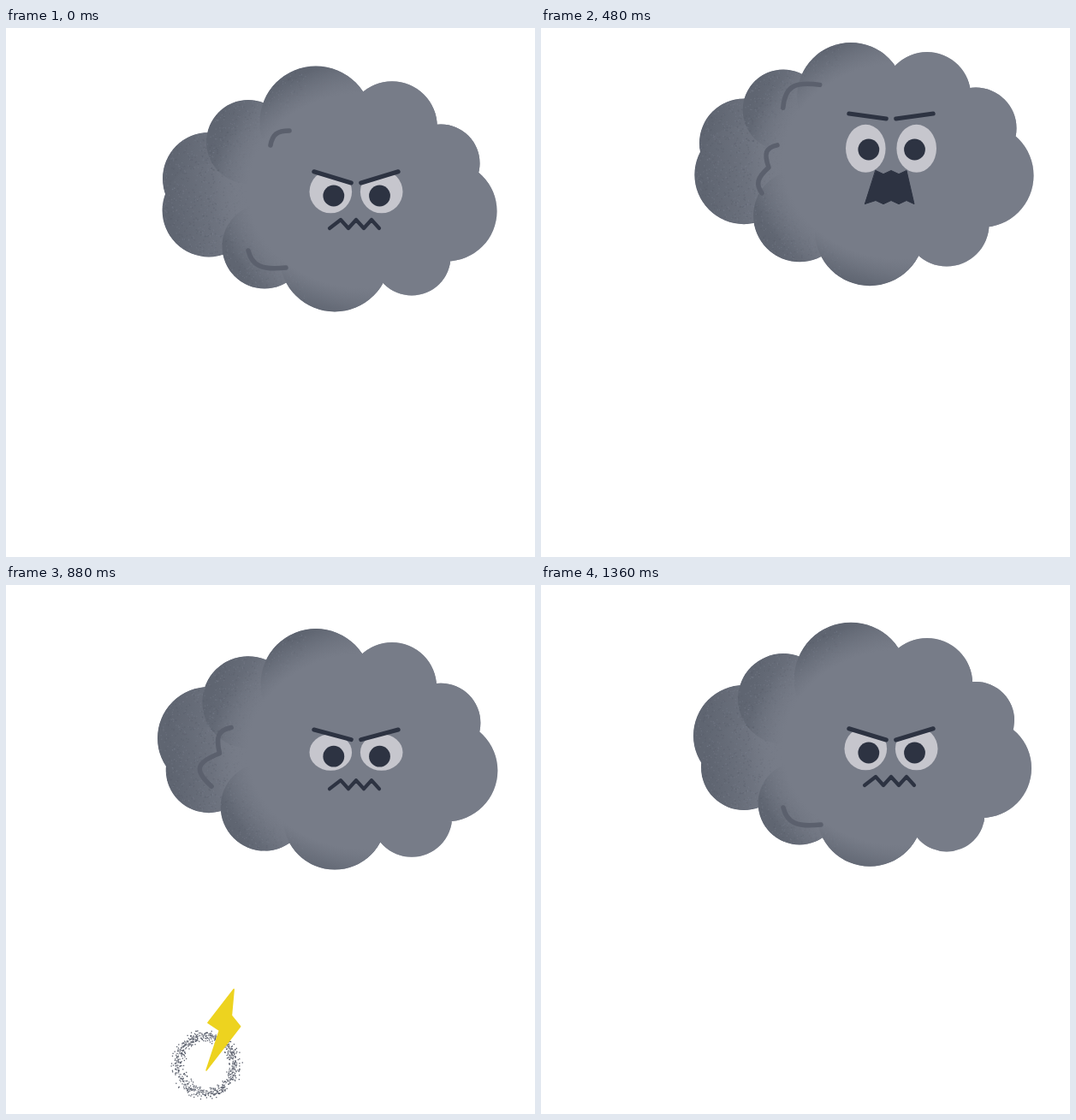
An HTML page with a canvas for the animation above (1.44 s loop, 618 by 618 pixels).

```html
<!DOCTYPE html>
<html>
<head>
<meta charset="utf-8">
<style>
html, body { margin: 0; height: 100%; overflow: hidden; background: #fff; }
canvas { display: block; }
</style>
</head>
<body>
<canvas id="stage" width="618" height="618"></canvas>
<script>
const ctx = document.getElementById('stage').getContext('2d');
const LOOP = 1440, STEP = 80, TAU = Math.PI * 2;
const BASE = '#777c88', DARK = '#5f6571', INK = '#2d3342', SMOKE = '#5b606d';

const lerp = (a, b, p) => a + (b - a) * p;
const clamp = v => Math.max(0, Math.min(1, v));
const linear = p => p, easeOut = p => 1 - (1 - p) ** 2;

// Rest, rise, scream, strike, recoil, bounce, settle; a missing key means rest
const TIMES = [0, 160, 480, 640, 800, 1040, 1360, LOOP];
const EASES = [linear, easeOut, p => p ** 3, linear, linear, p => 1 - (1 - p) ** 4, linear];
const TRACKS = {
  lift: [0, -20, -29, 13, 10, -3],
  bend: [0, 0.025, -0.09, -0.075, -0.01, -0.04],
  sway: [-2, 3, -4, 1, 8, -4, 3],
  swell: [-3, 2, 1, 7, -3, 2, -4],
  gaze: [196, 158.5, 142, 193.5, 205.5, 189.5],
  brow: [-15, -27, -36, -9.5, -20, -18.5],
  eye: [25, 26.5, 28, 8.7, 19.5, 25],
  gap: [0, 20, 35, 17]
};

// Puffs: x, y, radius, share of sway, share of swell. The first six are shaded.
const PUFFS = [
  [237, 176, 56, 1, 0], [237, 213, 54, -0.8, 0.4], [283, 133, 50.5, 0.8, 0],
  [302, 255, 52.8, 0, 1.1], [362, 110, 63.5, 0, -0.7], [384, 267, 62, -0.6, -0.4],
  [451, 115, 51.5, 0, -0.4], [508, 158, 47, 0, 0.5], [515, 214, 60, 0, 0.5], [474, 267, 48.5, 0, 1]
];

const BOLT = [[325, 320], [295, 387], [333, 388], [295, 447], [326, 447],
  [235, 555], [268, 483], [231, 484], [281, 416], [239, 417]];
const [TIP, NOTCH, RIGHT, FOOT, INNER, LEFT] =
  [[303, 364], [297, 430], [319, 457], [234, 567], [267, 467], [238, 448]];
const SHORT_BOLT = [TIP, NOTCH, NOTCH, NOTCH, RIGHT, FOOT, INNER, LEFT, LEFT, LEFT];

function poseAt(t) {
  const i = TIMES.findIndex((_, k) => t < TIMES[k + 1]);
  const p = EASES[i]((t - TIMES[i]) / (TIMES[i + 1] - TIMES[i]));
  const pose = {};
  for (const name in TRACKS) {
    const key = k => TRACKS[name][k] ?? TRACKS[name][0];
    pose[name] = lerp(key(i), key(i + 1), p);
  }
  return pose;
}

function seeded(seed) {
  return () => (seed = (seed * 16807) % 2147483647) / 2147483647;
}

function stroke(color, width) {
  ctx.strokeStyle = color;
  ctx.lineWidth = width;
  ctx.stroke();
}

function fill(color) {
  ctx.fillStyle = color;
  ctx.fill();
}

function disc(x, y, r, color) {
  ctx.beginPath();
  ctx.arc(x, y, r, 0, TAU);
  fill(color);
}

function polygon(points) {
  ctx.beginPath();
  points.forEach(point => ctx.lineTo(...point));
  ctx.closePath();
}

function drawCloud({ lift, bend, sway, swell }) {
  const puffs = PUFFS.map(([x, y, r, swayShare, swellShare]) =>
    [x, y + lift + bend * Math.abs(x - 375), r + sway * swayShare + swell * swellShare]);
  const middle = 190 + lift + bend * 60;

  ctx.save();
  ctx.beginPath();
  ctx.ellipse(378, middle, 130, 90, 0, 0, TAU);
  for (const [x, y, r] of puffs) {
    ctx.moveTo(x + r, y);
    ctx.arc(x, y, r, 0, TAU);
  }
  fill(BASE);
  ctx.clip();

  // Each shaded puff darkens outwards and to the left
  for (const [x, y, r] of puffs.slice(0, 6)) {
    const angle = Math.atan2(y - middle, x - 438);
    const dx = Math.cos(angle) * r, dy = Math.sin(angle) * r;
    const shade = ctx.createLinearGradient(x + dx, y + dy, x - dx, y - dy);
    shade.addColorStop(0.1, DARK);
    shade.addColorStop(0.9, BASE);
    disc(x, y, r, shade);
  }

  const random = seeded(7);
  for (let i = 0; i < 3000; i++) {
    ctx.fillStyle = i % 2 ? 'rgba(125,130,143,.35)' : 'rgba(88,94,106,.4)';
    ctx.fillRect(180 + random() * 170, middle - 145 + random() * 290, 1.4, 1.4);
  }

  // Soft light that hides the shading on the right
  ctx.translate(420, middle);
  ctx.scale(180, 150);
  const light = ctx.createRadialGradient(0, 0, 0.76, 0, 0, 1);
  light.addColorStop(0, BASE);
  light.addColorStop(1, BASE + '00');
  disc(0, 0, 1, light);
  ctx.restore();
}

// Rounded strokes through the given points: each curve is control x, y, end x, y
function curl(alpha, x, y, ...curves) {
  if (alpha <= 0) return;
  ctx.globalAlpha = clamp(alpha);
  ctx.beginPath();
  ctx.moveTo(x, y);
  for (const [cx, cy, endX, endY] of curves) {
    ctx.bezierCurveTo(lerp(x, cx, 0.75), lerp(y, cy, 0.75), lerp(endX, cx, 0.75), lerp(endY, cy, 0.75), endX, endY);
    [x, y] = [endX, endY];
  }
  stroke(SMOKE, 5.5);
  ctx.globalAlpha = 1;
}

function drawCurls(t, { lift, bend }) {
  ctx.save();
  ctx.translate(0, lift + bend * 90);
  const u = t / 640, v = (t - 480) / 560;
  curl((720 - t) / 130, 309 - 35 * u, 137 - 9 * u,
    [312 - 35 * u, 120 - 30 * u, 331 - 7 * u, 120 - 22 * u]);
  curl(Math.min((t - 360) / 100, (1160 - t) / 80), 276 - 18 * v, 174 - 16 * v,
    [258 - 21 * v, 178 - 16 * v, 266 - 23 * v, 200 - 10 * v],
    [248 - 50 * v, 216 - 13 * v, 258 - 25 * v, 230 + 2 * v]);
  const age = (t + 480) % LOOP, k = clamp((age - 80) / 250);
  curl(Math.min(age / 80, (800 - age) / 100), 289 - 6 * k, 251 + 9 * k,
    [297 - 8 * k, 272 + 12 * k, 327, 272 + 8 * k]);
  ctx.restore();
}

function drawEye({ gaze, brow, eye, gap }, x, side) {
  const outerX = x + side * 19.5, innerX = x - side * 24;
  const innerY = gaze + brow, outerY = gaze + brow * 0.65 - 18.5;
  const browAt = px => lerp(outerY, innerY, (px - outerX) / (innerX - outerX));
  const half = 24.8 - Math.max(0, eye - 25) * 0.5;
  const middle = gaze - 4.7 + gap * 0.1;

  ctx.save();
  polygon([[x - 27, browAt(x - 27)], [x + 27, browAt(x + 27)], [x + 27, 400], [x - 27, 400]]);
  ctx.clip();
  ctx.beginPath();
  ctx.roundRect(x - half, middle - eye, half * 2, eye * 2, { x: Math.min(half, eye * 1.25), y: eye });
  fill('#c6c6cd');
  ctx.restore();

  disc(x + (side < 0 ? 3.5 : -2.2), gaze, 12.4, INK);
  ctx.beginPath();
  ctx.moveTo(outerX, outerY);
  ctx.lineTo(innerX, innerY);
  stroke(INK, 5);
}

function drawMouth({ gaze, gap }) {
  const top = gaze + 28 - gap * 0.1, tooth = 10 - gap / 6, bottom = top + gap;
  const teeth = [0, 1, 2, 3, 4].map(i => [391 + 9 * i, top + (i % 2) * tooth]);
  polygon([[378, bottom + tooth], ...teeth.map(([x, y]) => [x, y + gap]),
    [436, bottom + tooth], ...teeth.reverse()]);
  fill(INK);
  stroke(INK, Math.max(1, 4.2 - gap / 5));
}

function drawBurst(t) {
  const k = (t - 640) / 80;
  if (k < 0 || k > 4) return;
  const outer = 19 + 4.8 * k, inner = Math.min(outer, 11 * k);
  if (outer > inner) {
    ctx.beginPath();
    ctx.arc(233, 559.5, (outer + inner) / 2, 0, TAU);
    stroke(SMOKE, outer - inner);
  }
  const random = seeded(31);
  ctx.fillStyle = SMOKE;
  for (let i = 0; i < 900 - k * 90; i++) {
    const angle = random() * TAU;
    const spread = (random() + random() + random() - 1.5) * 7;
    const r = (i % 4 || !inner ? outer : inner) + spread;
    ctx.fillRect(233 + Math.cos(angle) * r, 559.5 + Math.sin(angle) * r, 1.3, 1.3);
  }
}

function drawBolt(t) {
  if (t < 640 || t >= 960) return;
  const shorten = clamp((t - 640) / 160), size = 1 - clamp((t - 800) / 150);
  polygon(BOLT.map((point, i) => point.map((from, axis) =>
    lerp(FOOT[axis], lerp(from, SHORT_BOLT[i][axis], shorten), size))));
  fill('#edd31f');
  stroke('#edd31f', 1.5);
}

function draw() {
  const t = Math.floor(performance.now() % LOOP / STEP) * STEP;
  const pose = poseAt(t);
  ctx.fillStyle = '#fff';
  ctx.fillRect(0, 0, 618, 618);
  ctx.lineCap = ctx.lineJoin = 'round';
  drawCloud(pose);
  drawCurls(t, pose);
  drawEye(pose, 379.3, -1);
  drawEye(pose, 438.7, 1);
  drawMouth(pose);
  drawBurst(t);
  drawBolt(t);
  requestAnimationFrame(draw);
}
draw();
</script>
</body>
</html>
```
